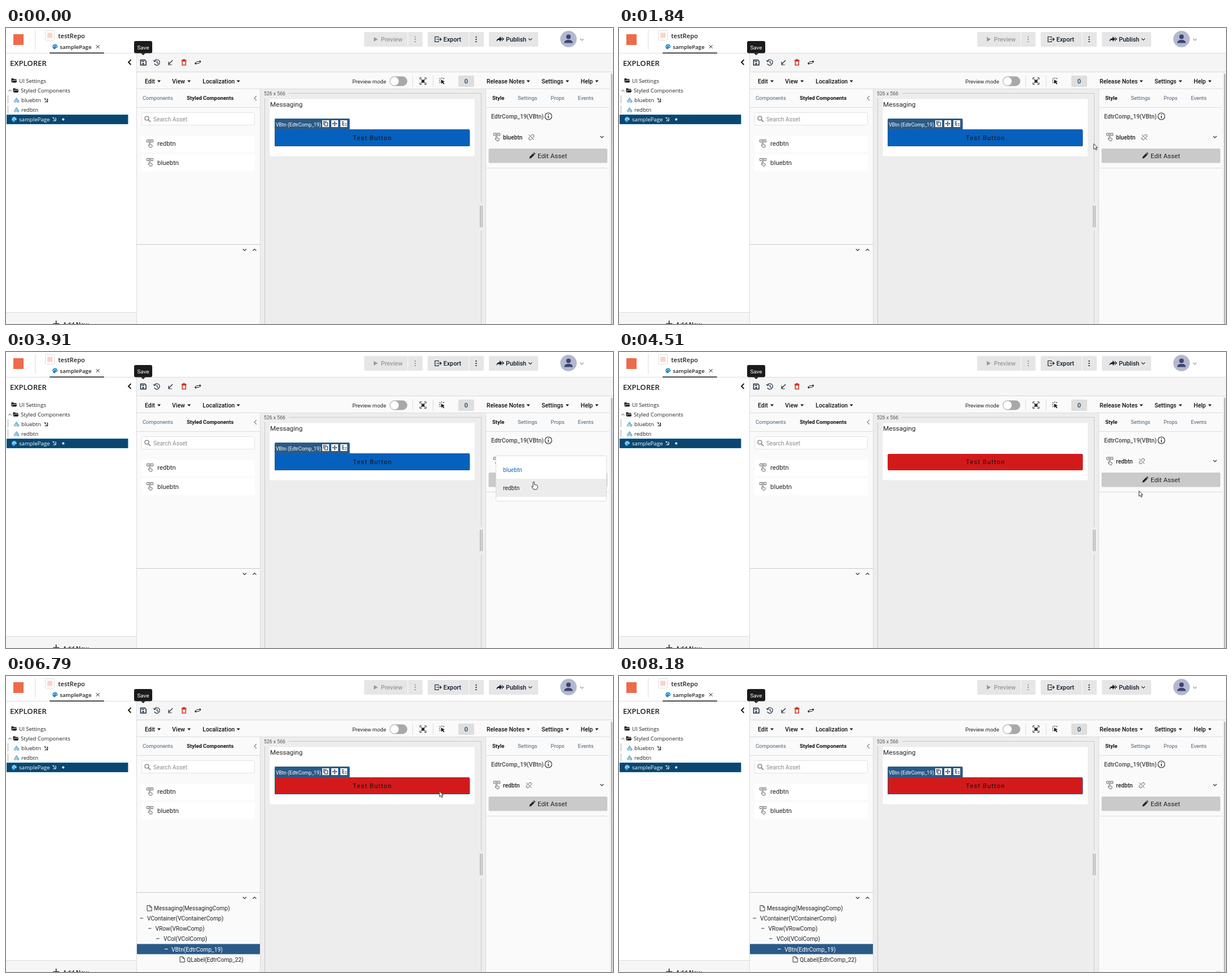
An HTML page that plays this animation: 1071x523 px, repeating every 8270 ms.

```html
<!DOCTYPE html>
<html lang="en">
<head>
<meta charset="utf-8">
<title>Switching a styled component</title>
<style>
html, body { margin: 0; width: 100%; height: 100%; overflow: hidden; background: #fff; }
svg { display: block; font: 10.2px Roboto, sans-serif; fill: #222; }
.o { font-family: "Open Sans", sans-serif; font-size: 9.6px; }
.b { font-weight: 700; }
.m { font-weight: 500; }
.tab { font-size: 9.4px; fill: #4a6078; }
.tab.b { fill: #111; }
.menu { font-size: 10.4px; font-weight: 500; fill: #111; }
.btn { font-size: 10.8px; font-weight: 500; fill: #0d1a2b; }
.tag { font-size: 8.8px; fill: #fff; }
.line { fill: none; stroke: #333; stroke-width: 1.2; }
.rule { fill: none; stroke: #dcdcdc; }
.dash { fill: none; stroke: #8aa5c0; stroke-dasharray: 2 1.5; }
.hide { display: none; }
</style>
</head>
<body>
<svg width="1071" height="523" viewBox="0 0 1071 523">
<defs>
  <path id="caret" d="M0 0h6l-3 3.5z"/>
  <path id="chev" class="line" d="M0 0l3 3 3-3"/>
  <path id="dots" d="M-1-5h2v2h-2zM-1-1h2v2h-2zM-1 3h2v2h-2z"/>
  <path id="folder" d="M0 0h3.5l1 1.2H9V3H2L.8 7H0zM2.4 3.8H10L8.7 7.6H1z"/>
  <g id="shapes" class="line" style="stroke:#2786b8;stroke-width:1">
    <path d="M4.500 .5l2 3.200h-4z"/><circle cx="2" cy="6.500" r="1.600"/><path d="M5.500 5h3v3h-3z"/>
  </g>
  <g id="palette">
    <path d="M4.500 0a4.500 4.500 0 0 0 0 9c1.500 0 .3-2 1.500-2.500 1.500-.6 3 .3 3-2A4.500 4.500 0 0 0 4.500 0"/>
    <path fill="#fff" d="M1.500 3.500h1.500v1.500H1.500zM3.500 1.500H5V3H3.500zM6 3h1.500v1.500H6z"/>
  </g>
  <path id="link" class="line" style="stroke:currentColor;stroke-width:1" d="M0 .5h3M.5.5l4.500 4.500M6 1v5H1M6 1H4.500"/>
  <g id="press" class="line" style="stroke:#666;stroke-width:1">
    <path d="M.5.5h11v4H.5zM3 2.500h6"/><path d="M4.500 11V6.500q1-1 2 0V9l3.500 1v2l-1 2H6l-3-4z"/>
  </g>
  <g id="acts">
    <path fill="#fff" d="M0 0h12v12H0zM16 0h12v12H16zM32 0h12v12H32z"/>
    <g class="line" style="stroke:#234;stroke-width:1.100">
      <path d="M4.500 4h5v6h-5zM2.500 8V2H8M22 2v8M18 6h8"/>
      <path d="M35 2.500h3M36 3v6h3M36 6h3M40 6h3M40 9h3"/>
    </g>
    <path fill="#234" d="M20.500 3.500L22 1.500l1.500 2zM20.500 8.500l1.500 2 1.500-2zM19.500 4.500l-2 1.500 2 1.500zM24.500 4.500l2 1.500-2 1.500z"/>
  </g>
  <path id="doc" class="line" style="stroke-width:1" d="M.5.5h5l3 3v6.500h-8zM5.500.5v3h3"/>
  <path id="unlink" class="line" style="stroke:#555;stroke-width:1" d="M4.500 3L6 1.500q2-1.500 3.500 0t0 3.500L8 6.500M6.500 8L5 9.500q-2 1.500-3.500 0t0-3.500L3 4.500M1 1l9 9"/>
</defs>

<!-- panels -->
<path fill="#fff" d="M0 0h1071v523H0z"/>
<path fill="#f5f5f5" d="M230 45h841v478H230zM0 502h230v21H0z"/>
<path fill="#fafafa" d="M231 79h834v444H231z"/>
<path fill="#ededed" d="M449 108h397v415H449z"/>
<path class="rule" d="M0 44.500h1071M230.500 45v478M231 77.500h840M231 107.500h834M231 140.500h217M847 140.500h217M448.500 108v415M846.500 108v415M847 247.500h217M0 502.500h230M51.500 4v34M717.500 84v20M753.500 84v20"/>
<path class="rule" style="stroke:#c8c8c8" d="M231 382.500h217M456.500 124v399M499 115.500h339.500v193M838.500 358v165"/>
<path class="rule" style="stroke:#aaa;stroke-width:1.500" d="M837 314v38M840 314v38"/>
<path fill="#b4b4b4" d="M1067.500 81h2.500v442h-2.500z"/>

<!-- header -->
<path fill="#ee6a4b" d="M13 11h18v19H13z"/>
<rect class="rule" x="69.500" y="4.500" width="16" height="17" rx="2"/>
<path fill="#fad3c8" d="M73 8.500h9v9h-9z"/>
<text class="o" x="92" y="17.500" style="font-size:11px;font-weight:600">testRepo</text>
<use href="#palette" x="82" y="28.500" fill="#1f86c9"/>
<text class="o" x="95" y="36.500" style="font-weight:600">samplePage</text>
<path class="line" style="stroke-width:1" d="M159 30l6 6M165 30l-6 6"/>
<path fill="#111" d="M77 43.500h96v1.500H77z"/>
<g fill="#e6e6e6">
  <rect x="632" y="7" width="103" height="26" rx="2"/>
  <rect x="744" y="7" width="99" height="26" rx="2"/>
  <rect x="852" y="7" width="87" height="26" rx="2"/>
  <path fill="#fafafa" d="M708.500 7h1v26h-1zM816.500 7h1v26h-1z"/>
</g>
<path fill="#999" d="M649 16v8l7-4z"/>
<text class="btn" x="661.500" y="24" style="fill:#9a9a9a">Preview</text>
<use href="#dots" x="722" y="20" fill="#999"/>
<path class="line" style="stroke:#0d1a2b" d="M763 17.500v-2h-6v9h6v-2M759.500 20h8.500M765.500 17.500L768 20l-2.500 2.500"/>
<text class="btn" x="787.500" y="23.500" text-anchor="middle">Export</text>
<use href="#dots" x="829.500" y="20"/>
<path fill="#0d1a2b" d="M865 24q1-6 6-6v-3l4.500 4.500-4.500 4.500v-3q-4 0-6 3zM874 15l5 4.500-5 4.500 2.500-4.500z"/>
<text class="btn" x="882" y="24">Publish</text>
<use href="#chev" x="922" y="18.500"/>
<circle cx="992.500" cy="19.500" r="14.500" fill="#b3b8cf"/>
<g fill="#3d4470"><circle cx="992.500" cy="15.500" r="4"/><path d="M985 26.500q0-5.500 7.500-5.500t7.500 5.500z"/></g>
<use href="#chev" x="1013" y="19" opacity=".5"/>

<!-- toolbar -->
<rect x="226" y="23" width="32" height="21.500" rx="3" fill="#1b1b1b"/>
<path fill="#1b1b1b" d="M238 44.500h8l-4 3.500z"/>
<text x="242" y="37.500" text-anchor="middle" style="font-size:9.800px;fill:#fff">Save</text>
<path class="line" style="stroke:#17263a;stroke-width:1.500" d="M237.500 56.500h7.500l2 2v7h-9.500zM239.500 59h4.500"/>
<circle cx="242" cy="63" r="1.600" fill="#17263a"/>
<g class="line" style="stroke:#17263a">
  <path d="M262 58a5 5 0 1 1-.3 5M260 57l2 2.500 2.500-1.500M266.500 58v3.500l2.500 1.500M294 57l-7 7M287 59.500V65h5.500M336 59.500h7M341.500 57.500l2 2-2 2M341 62.500h-7M335.500 60.500l-2 2 2 2"/>
  <path style="stroke:#cf2e1f;stroke-width:1.500" d="M311 58.500h6v7h-6zM309.500 57h9M312.500 55.500h3"/>
  <path style="stroke:#111;stroke-width:1.800" d="M220.500 56l-4.500 4.500 4.500 4.500"/>
</g>

<!-- explorer -->
<text class="o" x="7" y="67" style="font-size:13.100px;font-weight:600">EXPLORER</text>
<use href="#folder" x="9.500" y="89"/><text class="o" x="23" y="96.500">UI Settings</text>
<path class="line" style="stroke-width:1" d="M4.500 112l2.500-2.500 2.500 2.500"/>
<use href="#folder" x="12.500" y="106.500"/><text class="o" x="26" y="114">Styled Components</text>
<path class="rule" style="stroke:#aaa" d="M3.500 119v14M3.500 137v13"/>
<use href="#shapes" x="14" y="123"/><text class="o" x="27" y="131">bluebtn</text>
<use href="#link" x="67.500" y="124.500"/>
<use href="#shapes" x="14" y="140"/><text class="o" x="27" y="148">redbtn</text>
<path fill="#094771" stroke="#0b5c91" d="M1.500 153.500h213.500v16H1.500z"/>
<use href="#palette" x="10" y="157" fill="#4ab0e4"/>
<text class="o" x="23" y="165" style="fill:#fff">samplePage</text>
<use href="#link" x="82" y="158" color="#fff"/><circle cx="101" cy="161.500" r="2" fill="#fff"/>
<path class="line" style="stroke-width:1.700" d="M83 522.500h11M88.500 517v10"/>
<text class="m" x="100" y="528" style="font-size:11.500px">Add New</text>

<!-- menu bar -->
<g class="menu">
  <text x="245" y="98">Edit</text><use href="#caret" x="267" y="92.500"/>
  <text x="293" y="98">View</text><use href="#caret" x="320" y="92.500"/>
  <text x="347" y="98">Localization</text><use href="#caret" x="407" y="92.500"/>
  <text x="848" y="98">Release Notes</text><use href="#caret" x="918.500" y="92.500"/>
  <text x="945" y="98">Settings</text><use href="#caret" x="987.500" y="92.500"/>
  <text x="1014" y="98">Help</text><use href="#caret" x="1039.500" y="92.500"/>
</g>
<text x="611" y="97.500" style="font-size:9.500px">Preview mode</text>
<rect x="677" y="85.500" width="31" height="17" rx="8.500" fill="#a8a8a8"/>
<circle cx="685.500" cy="94" r="7.500" fill="#fff"/>
<path class="line" d="M730.500 91v-3h3M738 88h3v3M741 96.500v3h-3M733.500 99.500h-3v-3M732.500 90.500l6.500 7M739 90.500l-6.500 7"/>
<circle cx="735.800" cy="94" r="2.600"/>
<path fill="#111" d="M767.500 91.500l6.500 3-2.600 1 2 3-1.400 1-2-3-2 2z"/>
<path class="line" d="M764 93h2M765 89l1.500 1.500M769 87.500v2M773 88.500l-1.500 1.500M765 97l1.500-1.500"/>
<rect x="798" y="84" width="28" height="20" rx="2" fill="#dedede"/>
<text class="m" x="812" y="98" text-anchor="middle" style="font-size:11px;fill:#1d4468">0</text>

<!-- component list -->
<text class="tab" x="241" y="126.500">Components</text>
<text class="tab b" x="319" y="126.500">Styled Components</text>
<path class="line" style="stroke:#888" d="M442 120l-4 4 4 4"/>
<rect x="239.500" y="149.500" width="199" height="22" rx="2" fill="#fff" stroke="#e2e2e2"/>
<g class="line" style="stroke:#666"><circle cx="248.500" cy="159.500" r="3.500"/><path d="M251 162l4 4"/></g>
<text x="260" y="164.500" style="fill:#8a8a8a">Search Asset</text>
<path fill="#fff" d="M239 190h200v29H239zM239 223h200v30H239z"/>
<use href="#press" x="248" y="197"/><text x="267" y="208" style="font-size:11.400px">redbtn</text>
<use href="#press" x="248" y="230"/><text x="267" y="241.500" style="font-size:11.400px">bluebtn</text>
<use href="#chev" x="418" y="390.500"/>
<path class="line" d="M435.500 393.500l3-3 3 3"/>

<g id="tree">
  <path fill="#2a5a88" d="M231 473.500h217v18H231z"/>
  <use href="#doc" x="248.500" y="405"/><text x="261" y="413.500">Messaging(MessagingComp)</text>
  <path class="line" d="M236.500 428h5.500M251 446h5.500M265 464h5.500"/>
  <path class="line" style="stroke:#fff" d="M280 482.500h5.500"/>
  <text x="249" y="431.500">VContainer(VContainerComp)</text>
  <text x="263.500" y="450">VRow(VRowComp)</text>
  <text x="278" y="468">VCol(VColComp)</text>
  <text x="292" y="486.500" style="fill:#fff">VBtn(EdtrComp_19)</text>
  <use href="#doc" x="306.500" y="495.500"/><text x="319" y="504.500">QLabel(EdtrComp_22)</text>
</g>

<!-- canvas -->
<text x="455" y="119" style="font-size:8.700px;fill:#555">526 x 566</text>
<path fill="#fff" d="M465.500 125.500H827v101H465.500z"/>
<text x="466" y="138.500" style="font-size:11.700px">Messaging</text>
<g id="hover">
  <path class="dash" d="M465.500 162.500h361v63h-361zM465.500 171.500h361M465.500 217.500h361"/>
  <path fill="#7b98b4" d="M465 142.500h171v20H465z"/>
  <text class="tag" x="467" y="156" style="fill:#20405e">VContainer (VContainerComp)</text>
  <use href="#acts" x="587.500" y="146"/>
  <path fill="#7b98b4" d="M465 153h121v18H465z"/>
  <text class="tag" x="467" y="164.500" style="fill:#20405e">VCol (VColComp)</text>
  <use href="#acts" x="538" y="154"/>
</g>
<rect id="button" x="474" y="180" width="344.500" height="29" rx="2.500"/>
<g id="tag">
  <path fill="none" stroke="#2a5a88" d="M474.500 179.500h343v29h-343z"/>
  <path fill="#2a5a88" d="M474 180v-18q0-2 2-2h128.500q2 0 2 2v18z"/>
  <text class="tag" x="476" y="173.500">VBtn (EdtrComp_19)</text>
  <use href="#acts" x="558" y="163"/>
</g>
<text x="612" y="198" style="font-size:11.200px;letter-spacing:1.100px;fill:#111">Test Button</text>

<!-- properties -->
<text class="tab b" x="858" y="126.500">Style</text>
<text class="tab" x="903" y="126.500">Settings</text>
<text class="tab" x="961" y="126.500">Props</text>
<text class="tab" x="1009" y="126.500">Events</text>
<text class="m" x="856" y="160" style="font-size:10.400px;fill:#444">EdtrComp_19(VBtn)</text>
<circle class="line" cx="957" cy="156" r="6"/>
<path class="line" style="stroke-width:1.500" d="M957 155v4.500M957 152v1.500"/>
<use href="#press" x="860" y="185.500"/>
<text class="m" id="asset" x="877" y="197"></text>
<use href="#unlink" id="chain" y="187.500"/>
<use href="#chev" x="1048.500" y="191"/>
<rect x="851.500" y="213" width="209.500" height="25.500" rx="2" fill="#cacaca"/>
<path d="M923.500 230.500l.5-3 6-6 2.500 2.500-6 6zM930.700 220.800l1-1q1 0 2.400 2.500l-1 1z"/>
<text x="938" y="230" style="font-size:11.600px">Edit Asset</text>

<g id="list">
  <rect x="864.500" y="183.500" width="195" height="80" rx="2" fill="#fff" stroke="#ddd"/>
  <path id="row" fill="#ececec" d="M865 192h194v32H865z"/>
  <text x="877" y="212" style="fill:#1867c0">bluebtn</text>
  <text x="877" y="244">redbtn</text>
</g>

<ellipse id="spot" cx="1058" cy="523" rx="5" ry="2" fill="#fff04a"/>
<g id="cursor" fill="#fff" stroke="#333" stroke-linejoin="round">
  <path id="arrow" d="M.5.5v9.500l2.200-2 1.600 3.500 1.700-.8-1.600-3.400h3z"/>
  <path id="hand" d="M-1.500 8V1.500q1.200-1.500 2.400 0V6l4.600 1q1 .3 1 1.500v3l-1.500 3H-.5L-4 9.500q.3-1.700 2.500.5z"/>
</g>
</svg>
<script>
const LOOP = 8270;
// pointer path: time, x, y
const PATH = [
  [390, 1018, 509], [700, 900, 360], [950, 770, 214], [1160, 733, 188],
  [1230, 733, 188], [1700, 815, 211], [2050, 870, 194], [2750, 960, 193],
  [2950, 962, 192], [3490, 962, 193], [4110, 917, 245], [5040, 917, 245],
  [5590, 790, 211], [5870, 764, 203], [6790, 764, 203], [7570, 1026, 492],
  [7900, 1050, 526]
];
const $ = id => document.getElementById(id);
const show = (id, on) => $(id).classList.toggle("hide", !on);
const within = (t, a, b) => t >= a && t < b;

function pointer(t) {
  const i = PATH.findIndex(p => p[0] > t);
  if (i < 1) return null;
  const [t0, x0, y0] = PATH[i - 1], [t1, x1, y1] = PATH[i];
  const k = (t - t0) / (t1 - t0);
  return { x: x0 + (x1 - x0) * k, y: y0 + (y1 - y0) * k };
}

function draw(t) {
  const p = pointer(t), red = t >= 4440;
  const inside = p && p.x > 465 && p.x < 826 && p.y < 226;
  const pointing = within(t, 2050, 4440);

  show("cursor", p);
  if (p) $("cursor").setAttribute("transform", `translate(${p.x} ${p.y})`);
  show("arrow", !pointing);
  show("hand", pointing);
  show("hover", inside && t < 6790);

  $("button").setAttribute("fill", red ? "#d31a1b" : "#0561bd");
  $("asset").textContent = red ? "redbtn" : "bluebtn";
  $("chain").setAttribute("x", red ? 917 : 921.5);
  show("tag", !within(t, 4440, 4710));
  show("tree", t >= 4710);

  show("list", within(t, 3240, 4440));
  $("list").setAttribute("opacity", t < 3310 ? 0.6 : 1);
  $("row").setAttribute("transform", `translate(0 ${p && p.y > 224 ? 32 : 0})`);
  show("spot", t >= 8180);
}

const start = performance.now();
function tick() {
  draw((performance.now() - start) % LOOP);
  requestAnimationFrame(tick);
}
tick();
</script>
</body>
</html>
```
